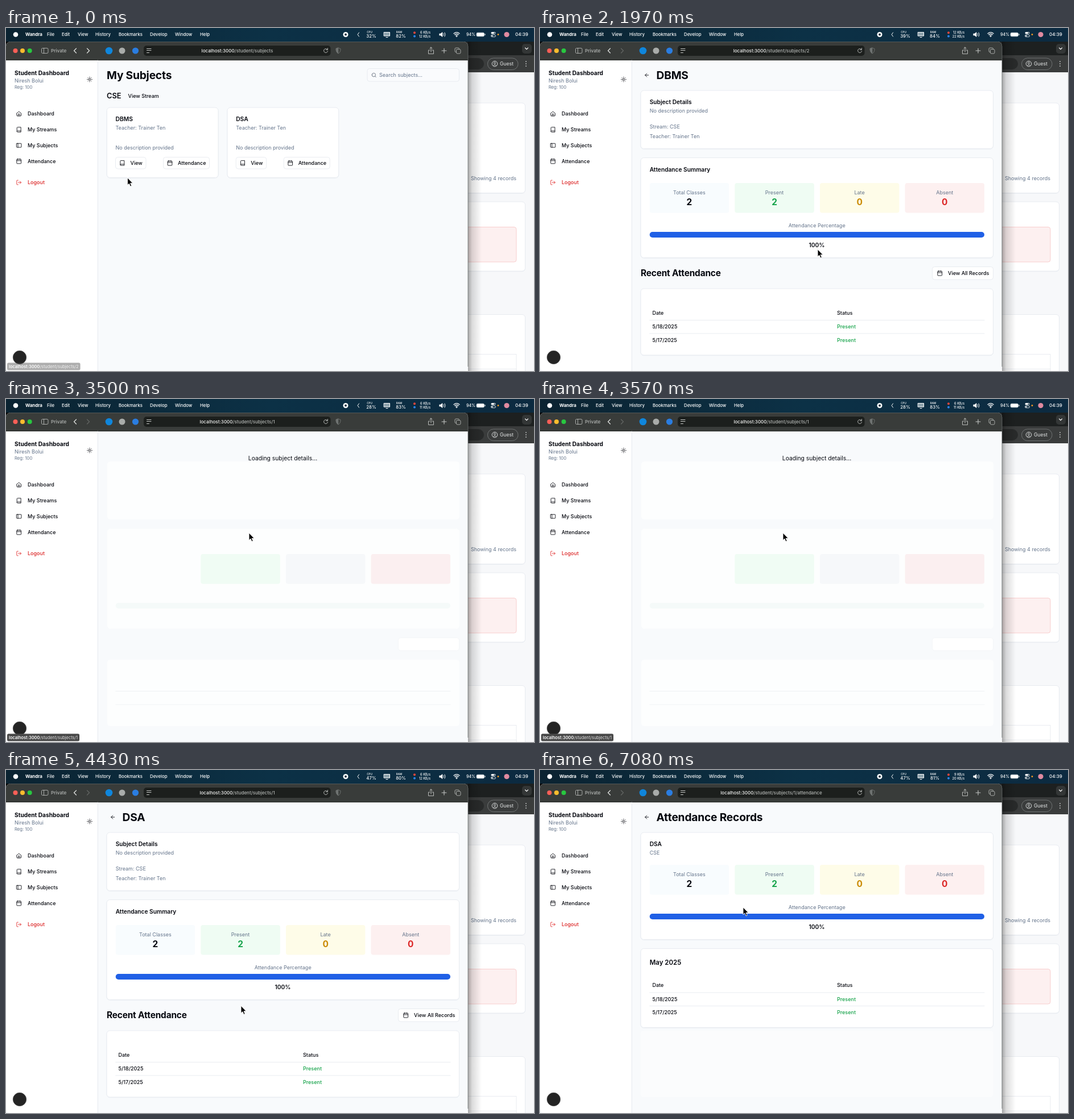
An HTML page that plays this animation: 928 by 604 pixels, repeating every 7.13 s.

```html
<!DOCTYPE html>
<html lang="en">
<head>
<meta charset="utf-8">
<title>Student Dashboard</title>
<style>
  html, body { margin: 0; width: 100%; height: 100%; overflow: hidden; background: #000; }
  svg { display: block; width: 928px; height: 604px; }
  text { font-family: Inter, Roboto, "Liberation Sans", sans-serif; white-space: pre; }
  .hide { display: none; }
</style>
</head>
<body>
<svg id="stage" viewBox="0 0 928 604" xmlns="http://www.w3.org/2000/svg"></svg>
<script>
const LOOP = 7130;
const INK = '#06080f', MUTED = '#64748b', LINE = '#e4e8ee', GREEN = '#16a34a';
const PERSON = 'Niresh Bolui', TEACHER = 'Trainer Ten', APP = 'Wandra';

// Drawing helpers; text is placed by its vertical centre.
const text = (x, y, s, size = 9, fill = INK, weight = 400, more = '') =>
  `<text x="${x}" y="${(y + size * .36).toFixed(2)}" font-size="${size}" fill="${fill}" font-weight="${weight}" ${more}>${s}</text>`;
const mid = 'text-anchor="middle"';
const rect = (x, y, w, h, r, fill, stroke = 'none', more = '') =>
  `<rect x="${x}" y="${y}" width="${w}" height="${h}" rx="${r}" fill="${fill}" stroke="${stroke}" stroke-width=".8" ${more}/>`;
const dot = (x, y, r, fill, more = '') => `<circle cx="${x}" cy="${y}" r="${r}" fill="${fill}" ${more}/>`;
const path = (d, stroke, w = 1, fill = 'none', more = '') =>
  `<path d="${d}" fill="${fill}" stroke="${stroke}" stroke-width="${w}" stroke-linecap="round" stroke-linejoin="round" ${more}/>`;
const group = (id, body, hidden = true) => `<g id="${id}"${hidden ? ' class="hide"' : ''}>${body}</g>`;
const card = (x, y, w, h) =>
  rect(x, y + .8, w, h, 5.5, 'none', '#e9edf2') + rect(x, y, w, h, 5.5, '#fff', LINE);
const heading = (x, s) => text(x, 83, s, 19.2, INK, 700, 'letter-spacing="-.01em"');

// Icons on a 24 unit grid, centred on x, y.
const ICONS = {
  home: 'M3 10l9-7 9 7v9a2 2 0 0 1-2 2H5a2 2 0 0 1-2-2zM9 21v-8h6v8',
  book: 'M4 19.5V4.5A2.5 2.5 0 0 1 6.500 2H20v20H6.500a2.500 2.500 0 0 1 0-5H20',
  panel: 'M4 4h16a2 2 0 0 1 2 2v12a2 2 0 0 1-2 2H4a2 2 0 0 1-2-2V6a2 2 0 0 1 2-2zM8 4v16',
  calendar: 'M8 2v4M16 2v4M5 4h14a2 2 0 0 1 2 2v14a2 2 0 0 1-2 2H5a2 2 0 0 1-2-2V6a2 2 0 0 1 2-2zM3 10h18',
  logout: 'M9 21H5a2 2 0 0 1-2-2V5a2 2 0 0 1 2-2h4M16 17l5-5-5-5M21 12H9',
  sun: 'M8 12a4 4 0 1 0 8 0a4 4 0 1 0-8 0M12 2v2M12 20v2M5 5l1.400 1.400M17.600 17.600L19 19M2 12h2M20 12h2M5 19l1.400-1.400M17.600 6.400L19 5',
  search: 'M3 11a8 8 0 1 0 16 0a8 8 0 1 0-16 0M21 21l-4.300-4.300',
  back: 'M12 19l-7-7 7-7M19 12H5'
};
const icon = (name, x, y, color = INK, k = .43) =>
  path(ICONS[name], color, 2, 'none', `transform="translate(${x - 12 * k} ${y - 12 * k}) scale(${k})"`);

function menuBar() {
  const items = [['File', 72], ['Edit', 98], ['View', 126], ['History', 157], ['Bookmarks', 198],
    ['Develop', 253], ['Window', 297], ['Help', 341]];
  const W = '#fff';
  return rect(0, 0, 928, 24, 0, 'url(#bar)') + dot(17, 11.5, 4.3, W) + text(34, 11.2, APP, 7.9, W, 700) +
    items.map(([s, x]) => text(x, 11.2, s, 7.8, W, 500)).join('') +
    dot(597, 11.5, 4.5, W) + rect(595.3, 9.8, 3.4, 3.4, .8, '#0b2a3c') +
    path('M620.500 8l-2.500 3.500 2.500 3.500', W, 1) +
    text(639, 7.2, 'CPU', 4.6, W, 500, mid) + text(642, 14, '', 7.8, W, 500, mid + ' id="cpu"') +
    path('M664.500 7.500h10v6.500h-10zM668 16.500h3', W, 1, '#8fa3ad') +
    text(691, 7.2, 'RAM', 4.6, W, 500, mid) + text(694, 14, '', 7.8, W, 500, mid + ' id="ram"') +
    dot(718, 8.3, 2, '#f0473c') + dot(718, 14.600, 2, '#2a86f0') +
    text(746, 8.3, '', 5.7, W, 500, 'text-anchor="end" id="up"') +
    text(746, 14.600, '', 5.7, W, 500, 'text-anchor="end" id="down"') +
    path('M762 10h2l3-2.500v8l-3-2.500h-2z', W, .6, W) +
    path('M769 9.500q1.500 2 0 4M771 8q2.500 3.500 0 7', W, .9) +
    path('M787 9.800q5-4.200 10 0M788.800 11.800q3.200-2.600 6.400 0M790.600 13.700q1.400-1 2.800 0', W, 1.300) + dot(792, 15, .9, W) +
    text(809, 11.5, '94%', 7.1, W, 500) + rect(827, 8.200, 13.500, 6.600, 2, W, '#b7c4cb') + path('M842 10.500v2', W, 1) +
    rect(852.500, 7, 8, 3.600, 1.800, W) + rect(852.500, 12, 8, 3.600, 1.800, 'none', W) + dot(858.500, 8.800, 1.100, '#0b2a3c') + dot(854.500, 13.800, 1.100, W) +
    dot(865, 11.500, 1.400, '#f59a23') + dot(880, 11.500, 4.600, '#e08aa0') + text(895, 11.300, '04:39', 8, W, 500);
}

function rearWindow() {
  return rect(790, 24, 138, 580, 0, '#f7f8fa') + rect(790, 24, 138, 25, 0, '#1d2020') + rect(790, 48, 138, 30, 0, '#3a3c3c') +
    rect(780, 53, 60, 20, 10, '#282a2a') + rect(907, 28, 17, 17, 5, '#333636') + path('M912.500 35l2.500 2.500 2.500-2.500', '#eee', 1.200) +
    rect(846.500, 53, 53.500, 20.500, 10.200, 'none', '#7d8080') + dot(859, 63, 4.800, 'none', 'stroke="#d5d7d7"') +
    dot(859, 61.700, 1.600, 'none', 'stroke="#d5d7d7" stroke-width=".9"') + path('M856.300 66q2.700-2.600 5.400 0', '#d5d7d7', .9) +
    text(868, 63.300, 'Guest', 8.500, '#d0d2d2', 500) + [59, 63, 67].map(y => dot(914, y, .9, '#c7c9c9')).join('') +
    card(700, 132, 212.500, 158.500) + text(897, 265, 'Showing 4 records', 9, MUTED, 400, 'text-anchor="end"') +
    card(700, 306, 212.500, 122) + rect(700, 350.500, 197, 61.500, 4, '#fdf0f0', '#f6c4c4') +
    card(700, 504.500, 212.500, 130) + path('M800 574.500h97v40M800 600.500h97', LINE, .8) +
    rect(812, 24, 24, 580, 0, 'url(#shade)');
}

function toolbar() {
  const G = '#c6c8c6';
  return `<path d="M0 604V32a8 8 0 0 1 8-8H804a8 8 0 0 1 8 8V596a8 8 0 0 1-8 8z" fill="#f8fafc"/>` +
    `<path d="M0 57V32a8 8 0 0 1 8-8H804a8 8 0 0 1 8 8V57z" fill="#393c3a"/>` +
    path('M8 24.500H804', '#5c605e', .8) + path('M0 56.600H812', '#232524', .8) +
    dot(16.500, 40, 4, '#fe5f57') + dot(29, 40, 4, '#febc2e') + dot(41.700, 40, 4, '#28c840') +
    rect(62.500, 35.500, 11.500, 9, 2, 'none', G) + path('M66.500 35.500v9', G, .8) + text(79, 40, 'Private', 8.2, '#b4b7b5', 500) +
    path('M123.500 36l-4 4 4 4', '#e2e4e2', 1.200) + path('M142.500 36l4 4-4 4', '#e2e4e2', 1.200, 'none', 'id="fwd"') +
    dot(181, 40, 6.300, '#0f86dc') + dot(204, 40, 5.500, '#a9acaa') + dot(227.500, 40, 5.600, '#2a7de1') +
    rect(242, 31, 328.500, 18, 5, '#1c1f1d') + path('M247.500 36.500h7.500M247.500 39.500h7.500M247.500 43.500h4', G, 1) +
    text(406.500, 40.300, '', 8.05, '#f4f5f4', 500, mid + ' id="url"') +
    path('M565 38a3.500 3.500 0 1 0 .5 2.800M565.300 35.500v2.800h-2.800', G, .9) +
    path('M584 35l4 1.500q.3 6-4 8.500q-4.300-2.500-4-8.500z', '#6f7371', .9) + path('M584 35v10q-4.300-2.500-4-8.500z', '#6f7371', .5, '#6f7371') +
    path('M745 39h-2.500v6.500h9V39H749M747 42v-8M744.800 36l2.200-2.200 2.200 2.200', G, .9) +
    path('M770 36v8M766 40h8', G, 1.100) + rect(789, 35, 7.500, 7.500, 1.800, 'none', G) + rect(791.500, 37.500, 7.500, 7.500, 1.800, '#393c3a', G);
}

function sidebar() {
  const links = [['home', 'Dashboard', 151], ['book', 'My Streams', 179], ['panel', 'My Subjects', 206.700], ['calendar', 'Attendance', 234.500]];
  return `<path d="M0 57H161V604H8a8 8 0 0 1-8-8z" fill="#fff"/>` + path('M161.300 57V604', LINE, .9) +
    text(15, 79, 'Student Dashboard', 10.2, INK, 700) + text(15, 93, PERSON, 9, MUTED) + text(15, 104, 'Reg: 100', 7.700, MUTED) +
    icon('sun', 147, 90.500) +
    links.map(([i, s, y]) => icon(i, 22.700, y) + text(38, y, s, 9, INK, 500)).join('') +
    icon('logout', 22.700, 272, '#e02a2a') + text(38, 272.200, 'Logout', 9, '#dc2626', 500);
}

function subjectCard(x, name, id) {
  return text(x + 15.500, 160.500, name, 10.3, INK, 600) + text(x + 15.500, 175.700, 'Teacher: ' + TEACHER, 9, MUTED) +
    text(x + 15.500, 211, 'No description provided', 9, MUTED) +
    rect(x + 15.500, 227.500, 53.500, 20.500, 4, '#fff', LINE, `id="${id}"`) + rect(x + 99.500, 227.500, 81, 20.500, 4, '#fff', LINE) +
    icon('book', x + 27.300, 237.700) + text(x + 41.500, 237.700, 'View', 9, INK, 500) +
    icon('calendar', x + 111, 237.700) + text(x + 125, 237.700, 'Attendance', 9, INK, 500);
}

function stats(dy) {
  const boxes = [['Total Classes', 2, '#f8fcfe', INK], ['Present', 2, '#effcf3', GREEN],
    ['Late', 0, '#fefce8', '#ca8a04'], ['Absent', 0, '#fdf0f0', '#dc2626']];
  return `<g transform="translate(0 ${dy})">` + boxes.map(([s, n, bg, color], i) => {
    const x = 192.700 + i * 149.600, c = x + 69.700;
    return rect(x, 273, 139.500, 52.500, 4, bg) + text(c, 289.500, s, 9, MUTED, 400, mid) + text(c, 306, n, 15.4, color, 700, mid);
  }).join('') + text(486.700, 347.700, 'Attendance Percentage', 9, MUTED, 400, mid) +
    rect(192.700, 359, 588.300, 10, 5, '#2060e6') + text(486.500, 382, '100%', 10.2, INK, 600, mid) + '</g>';
}

function table(dy) {
  const rows = ['5/18/2025', '5/17/2025'];
  return `<g transform="translate(0 ${dy})">` + text(197.500, 501.700, 'Date', 9, INK, 500) + text(522, 501.700, 'Status', 9, INK, 500) +
    rows.map((d, i) => text(197.500, 526 + i * 23.500, d, 9, INK, 500) + text(522, 526 + i * 23.500, 'Present', 9, GREEN, 500) +
      path(`M192.700 ${514.500 + i * 23.500}H781`, LINE, .8)).join('') + '</g>';
}

const detailPage = () => icon('back', 187.700, 83) + text(204.500, 83, '', 19.2, INK, 700, 'letter-spacing="-.01em" id="subject"') +
  card(177, 110, 619.500, 102.500) + text(192.700, 130.500, 'Subject Details', 10.2, INK, 600) + text(192.700, 145.500, 'No description provided', 9, MUTED) +
  text(192.700, 173.300, 'Stream: CSE', 9, MUTED) + text(192.700, 191, 'Teacher: ' + TEACHER, 9, MUTED) +
  card(177, 228.500, 619.500, 176) + text(192.700, 249.300, 'Attendance Summary', 10.2, INK, 600) + stats(0) +
  text(177, 431.500, 'Recent Attendance', 15.4, INK, 700, 'letter-spacing="-.01em"') +
  rect(689.500, 420.500, 107, 22.500, 4, '#fff', LINE, 'id="hoverAll"') + icon('calendar', 702.700, 431.700) + text(717, 431.700, 'View All Records', 9, INK, 500) +
  card(177, 459, 619.500, 117) + table(0);

const recordsPage = () => icon('back', 187.700, 83) + heading(204.500, 'Attendance Records') +
  card(177, 110, 619.500, 188.500) + text(192.700, 130.500, 'DSA', 10.2, INK, 600) + text(192.700, 145.500, 'CSE', 9, MUTED) + stats(-106) +
  card(177, 314.500, 619.500, 139) + text(192.700, 338.500, 'May 2025', 11.5, INK, 600) + table(-122.500) +
  rect(177, 459, 619.500, 117, 5.500, '#fbfcfd');

// Pale panels that stay behind the loading message.
const palePage = () => [[110, 102], [228.500, 176], [459, 117]].map(([y, h]) => rect(178, y, 619, h, 5.500, '#fdfefe')).join('') +
  ['#f0fcf4', '#f6f8fa', '#fbeff0'].map((c, i) => rect(342.300 + i * 149.600, 273, 139.500, 52.500, 4, c)).join('') +
  rect(192.700, 359, 588.300, 10, 5, '#f5faf9') + rect(689.500, 420.500, 107, 22.500, 4, '#fff', '#f1f4f7') +
  path('M192.700 514.500H781M192.700 538H781', '#eceff2', .8);

const pages = () =>
  group('subjects', heading(177, 'My Subjects') + rect(635, 71.500, 161.500, 22.500, 4, '#fafbfd', LINE) +
    icon('search', 646.700, 83, '#55606f', .4) + text(656, 83.200, 'Search subjects...', 9, MUTED)) +
  group('list', text(177, 119.300, 'CSE', 12.8, INK, 600) + text(214.500, 119.500, 'View Stream', 9, INK, 500) +
    card(177.300, 140, 195.700, 123.500) + card(389, 140, 195.700, 123.500) +
    subjectCard(177, 'DBMS', 'hover2') + subjectCard(388.700, 'DSA', 'hover1')) +
  group('listWait', rect(178, 140, 195, 124, 5.500, '#fdfefe') + rect(389, 140, 195.500, 124, 5.500, '#fdfefe') +
    text(486.500, 142.300, 'Loading subjects...', 10.3, INK, 400, mid)) +
  group('detail', detailPage()) +
  group('wait', palePage() + text(486.500, 104.300, '', 10.3, INK, 400, mid + ' id="waitText"')) +
  group('records', recordsPage());

const cursors = () => `<g id="cursor">` +
  group('arrow', path('M0 0V12.700L2.900 10.100 5 14.900 7.200 13.900 5.100 9.300H9Z', '#fff', .9, '#000')) +
  group('hand', path('M-1.300 8V1A1.300 1.300 0 0 1 1.300 1V5.500Q2.600 4.800 3.700 6Q5 5.400 6 6.600Q8 6.400 8 8.500V10Q8 13 6.500 15H.2Q-1 13-4.400 9.800Q-5 8-3.200 8Q-2.200 8.200-1.300 9.400Z', '#000', 1, '#fff') +
    path('M1.300 6v3M3.700 6.500v2.500M6 7v2', '#000', .8)) +
  group('beam', ['#fff', '#000'].map((c, i) => path('M-2.500-6.500Q0-6.500 0-5V5Q0 6.500-2.500 6.500M2.500-6.500Q0-6.500 0-5M0 5Q0 6.500 2.500 6.500M-1.500 1.500h3', c, i ? 1 : 2.600)).join('')) + '</g>';

const stops = (a, tag, attrs) => `<linearGradient id="${tag}" ${attrs}>` +
  a.map(([o, c, p = 1]) => `<stop offset="${o}" stop-color="${c}" stop-opacity="${p}"/>`).join('') + '</linearGradient>';

document.getElementById('stage').innerHTML =
  '<defs>' + stops([[0, '#0b2331'], [.5, '#0c3146'], [1, '#0c2a40']], 'bar', '') +
  stops([[0, '#000', .34], [.3, '#000', .14], [1, '#000', 0]], 'shade', '') + '</defs>' +
  rect(0, 0, 928, 604, 0, '#000') + menuBar() + rearWindow() + toolbar() + pages() + sidebar() +
  path('M812 32V596', '#6b6f70', .8) + dot(24, 580, 11.700, '#242424', 'stroke="#4a4a4a" stroke-width=".8"') +
  group('status', rect(2, 589.500, 10, 13, 2.500, '#484848', 'none', 'id="statusBox"') + text(5, 596, '', 7.4, '#e2e2e2', 400, 'id="statusText"'), false) +
  cursors();

const el = id => document.getElementById(id);
const PAGES = ['subjects', 'list', 'listWait', 'detail', 'wait', 'records'];
const ROOT = '/student/subjects';

// start, visible groups, path after ROOT, title or message
const SCENES = [
  [0, 'subjects list', '', ''],
  [1400, 'wait', '/2', 'Loading subject details...'],
  [1640, 'detail', '/2', 'DBMS'],
  [2690, 'subjects listWait', '', ''],
  [2900, 'subjects list', '', ''],
  [3450, 'wait', '/1', 'Loading subject details...'],
  [3800, 'detail', '/1', 'DSA'],
  [6280, 'wait', '/1/attendance', 'Loading attendance records...'],
  [6400, 'records', '/1/attendance', '']
];
// start, CPU, RAM, upload, download
const LOAD = [[0, 32, 82, 6, 12], [1000, 39, 84, 12, 22], [2300, 27, 83, 8, 12], [3300, 28, 83, 6, 11],
  [4200, 47, 80, 6, 12], [5300, 24, 81, 7, 11], [6700, 47, 81, 9, 20]];
// time, x, y, shape from then on
const MOVES = [[0, 213.500, 264, 'arrow'], [350, 252, 270, 'arrow'], [830, 222, 240, 'hand'], [1050, 226, 240, 'arrow'],
  [1230, 361, 284.500, 'arrow'], [1480, 446, 331, 'arrow'], [1800, 488, 390, 'arrow'], [2200, 488, 390, 'arrow'], [2640, 188, 83, 'arrow'],
  [2695, 186, 83, 'beam'], [2800, 186, 83, 'arrow'], [3230, 427, 236, 'hand'], [3450, 427, 236, 'arrow'], [3720, 427, 236, 'arrow'], [4430, 413, 415.500, 'arrow'],
  [4800, 300, 345, 'arrow'], [5185, 203, 372, 'arrow'], [5500, 440, 350, 'arrow'], [5770, 440, 350, 'arrow'], [5900, 712, 428, 'hand'],
  [5990, 739, 438.500, 'hand'], [6280, 739, 438.500, 'arrow'], [6520, 739, 438.500, 'arrow'], [7060, 357, 242, 'arrow']];
// from, to, link path, hovered button
const HOVERS = [[-300, 90, '/2', ''], [830, 1140, '/2', 'hover2'], [3230, 3800, '/1', 'hover1'], [5900, 6600, '/1/attendance', 'hoverAll']];

const last = (rows, t) => rows.reduce((a, r) => r[0] <= t ? r : a);
const toggle = (id, on) => el(id).classList.toggle('hide', !on);
const clamp = v => Math.max(0, Math.min(1, v));

function setScene(t) {
  const [, names, tail, label] = last(SCENES, t);
  const shown = names.split(' ');
  PAGES.forEach(p => toggle(p, shown.includes(p)));
  el('subject').textContent = el('waitText').textContent = label;
  el('url').innerHTML = `localhost:3000<tspan fill="#b3b6b4">${ROOT + tail}</tspan>`;
  el('fwd').setAttribute('opacity', tail ? .25 : 1);
}

function setLoad(t) {
  const [, cpu, ram, up, down] = last(LOAD, t);
  el('cpu').textContent = cpu + '%';
  el('ram').textContent = ram + '%';
  el('up').textContent = up + ' KB/s';
  el('down').textContent = down + ' KB/s';
}

function setHover(t) {
  const hover = HOVERS.find(([a, b]) => t >= a && t < b);
  ['hover1', 'hover2', 'hoverAll'].forEach(id => el(id).setAttribute('fill', hover && hover[3] === id ? '#eef2f8' : '#fff'));
  toggle('status', hover);
  if (!hover) return;
  const [from, to, tail] = hover;
  el('statusText').innerHTML = `<tspan fill="#fff" font-weight="600">localhost:3000</tspan>${ROOT + tail}`;
  el('statusBox').setAttribute('width', el('statusText').getComputedTextLength() + 6);
  el('status').setAttribute('opacity', Math.min(clamp((t - from) / 80), clamp((to - t) / 200)));
}

function setCursor(t) {
  const i = MOVES.indexOf(last(MOVES, t)), a = MOVES[i], b = MOVES[i + 1] || a;
  const p = clamp((t - a[0]) / (b[0] - a[0] || 1)), k = p * p * (3 - 2 * p);
  el('cursor').setAttribute('transform', `translate(${a[1] + (b[1] - a[1]) * k} ${a[2] + (b[2] - a[2]) * k})`);
  ['arrow', 'hand', 'beam'].forEach(s => toggle(s, s === a[3]));
}

const start = performance.now();
function draw() {
  const t = (performance.now() - start) % LOOP;
  setScene(t);
  setLoad(t);
  setHover(t);
  setCursor(t);
  requestAnimationFrame(draw);
}
draw();
</script>
</body>
</html>
```
